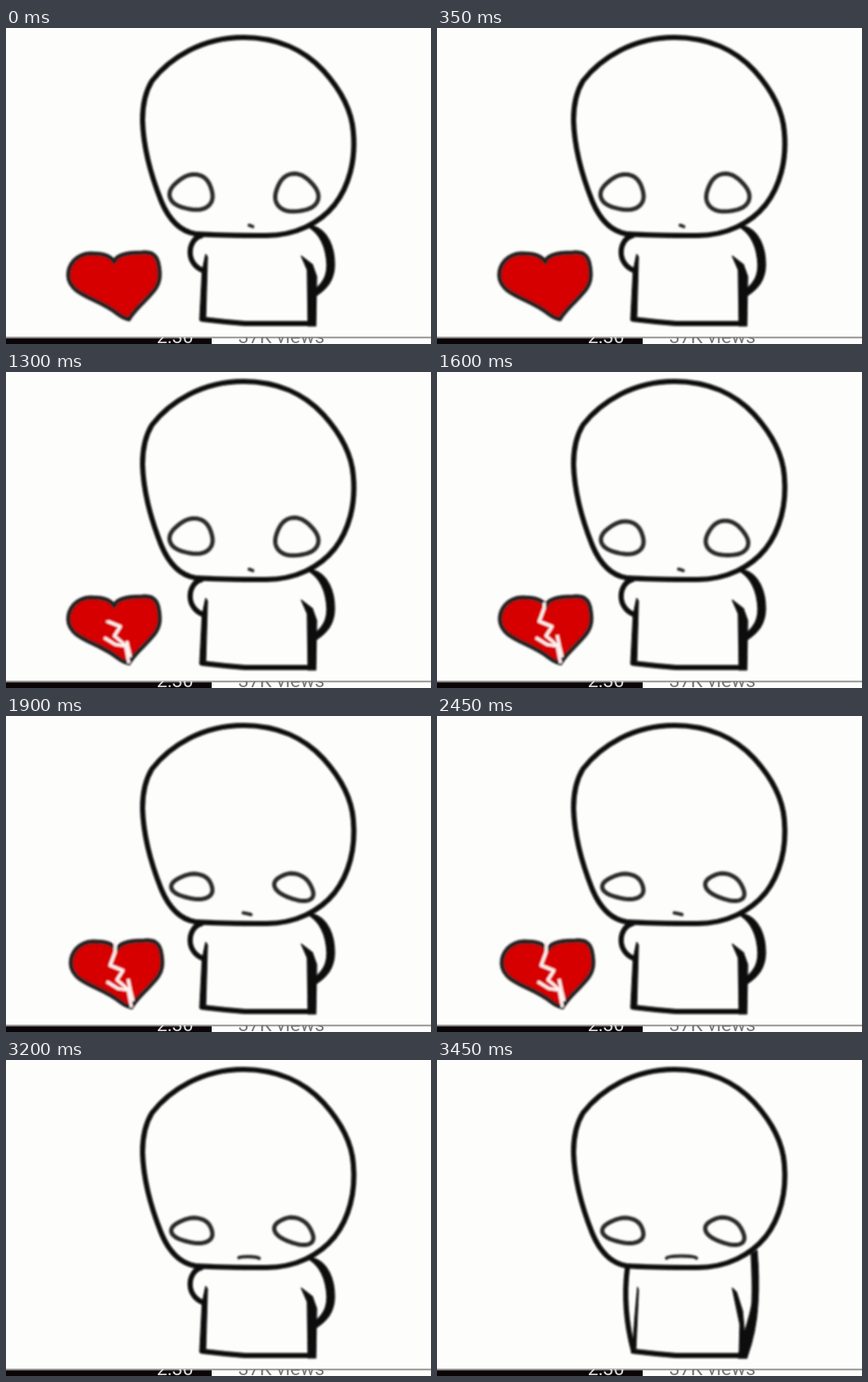
An HTML page for the animation above (4.5 s loop, 498 by 370 pixels).

```html
<!DOCTYPE html>
<html lang="en">
<head>
<meta charset="utf-8">
<title>Breaking heart</title>
<style>
  html, body { margin: 0; width: 100%; height: 100%; overflow: hidden; background: #fdfefc; }
  svg { display: block; width: 498px; height: 370px; }
  .ink { fill: none; stroke: #080808; stroke-width: 6; stroke-linecap: round; stroke-linejoin: round; }
  .thin { stroke: #2c2c2c; stroke-width: 5; }
  .solid { fill: #080808; stroke: #080808; stroke-width: 1.2; stroke-linejoin: round; }
  .crack { fill: none; stroke: #fff3f1; stroke-width: 3.6; stroke-linejoin: round; stroke-dasharray: 1 2; }
  text { font: 22.4px Roboto, Arial, sans-serif; }
</style>
</head>
<body>
<svg viewBox="0 0 498 370">
  <defs>
    <filter id="soft" x="0" y="0" width="498" height="370" filterUnits="userSpaceOnUse">
      <feGaussianBlur stdDeviation=".95"/>
    </filter>
    <clipPath id="strip"><rect y="362" width="498" height="8"/></clipPath>
  </defs>
  <rect width="498" height="370" fill="#fdfefc"/>

  <g filter="url(#soft)">
    <g id="heart">
      <path fill="#d60306" stroke="#282424" stroke-width="5" stroke-linejoin="round"
        d="M127 274C121 265 110 264 99 264C82 265 73 277 73 290C74 313 108 316 130 334Q138 340 144 341C150 330 164 319 172 309C181 299 181 289 179 278C177 265 170 262 159 263C146 263 129 265 127 274Z"/>
      <path id="crack" class="crack" pathLength="1" d="M144 341L140 320L127 309L134 298L119 292L125 276V261"/>
      <path id="forkL" class="crack" pathLength="1" d="M141 321L128 319L115 311"/>
      <path id="forkR" class="crack" pathLength="1" d="M146 334L143 322L140 308"/>
    </g>

    <path id="armL" class="ink"/>
    <path id="armR" class="solid"/>
    <path id="sideL" class="solid"/>
    <path id="sideR" class="solid"/>
    <path class="ink" d="M230 341Q255 344 280 346H360"/>

    <path class="ink" d="M278 11C318 11 350 26 372 50C390 70 405 94 407 122C410 155 402 185 385 207C368 228 340 243 305 243C280 243 250 243 222 241C203 238 190 222 182 203C172 178 161 145 160 108C160 93 163 75 171 62C192 35 230 11 278 11Z"/>
    <path id="eyeL" class="ink thin"/>
    <path id="eyeR" class="ink thin"/>
    <path id="mouth" class="ink thin" style="stroke-width:4"/>
  </g>

  <rect y="361.5" width="498" height="1.8" fill="#8d8d8d"/>
  <rect y="363.3" width="241" height="7" fill="#0b0507"/>
  <g clip-path="url(#strip)">
    <text x="176.5" y="369" fill="#dedcdc">2:30</text>
    <text x="272" y="369" fill="#777">37K views</text>
  </g>
</svg>
<script>
const LOOP = 4500, STEP = 50;
const set = (id, name, value) => document.getElementById(id).setAttribute(name, value);
const mix = (a, b, p) => a + (b - a) * p;
const progress = (t, from, to) => Math.min(1, Math.max(0, (t - from) / (to - from)));
const ease = p => p * p * (3 - 2 * p);

// blend two paths that share the same commands
function morph(a, b, p) {
  const goal = b.match(/[\d.]+/g);
  let i = 0;
  return a.replace(/[\d.]+/g, n => mix(+n, +goal[i++], p));
}

// tilted oval with three soft corners
function eyePath({ x, y, rx, ry, tilt, corner }) {
  const points = [];
  for (let i = 0; i < 48; i++) {
    const a = i / 48 * 2 * Math.PI;
    const r = 1 + .07 * Math.cos(3 * (a - corner));
    const u = rx * r * Math.cos(a), v = ry * r * Math.sin(a);
    const c = Math.cos(tilt), s = Math.sin(tilt);
    points.push([x + u * c - v * s, y + u * s + v * c]);
  }
  return 'M' + points.join('L') + 'Z';
}

const eyes = {
  eyeL: [{ x: 218, y: 193, rx: 25, ry: 20.5, tilt: 0, corner: .8 },
         { x: 219, y: 200, rx: 24, ry: 14.5, tilt: .08, corner: .8 }],
  eyeR: [{ x: 340, y: 194, rx: 25, ry: 22, tilt: .1, corner: .25 },
         { x: 338, y: 200.5, rx: 23.5, ry: 14.5, tilt: .35, corner: .5 }]
};

// arms behind the back, then hanging
const arms = {
  armL: ['M229 243C212 248 210 276 231 284',
         'M223 244C220 268 220 302 230 340'],
  armR: ['M358 231C378 236 385 258 385 277C385 295 376 306 361 315L361 307C372 298 376 290 376 277C375 256 368 242 356 234Z',
         'M375 223C377 245 377 268 376 285C375 306 370 330 363 349L353 349C355 330 366 306 369 285C370 262 369 244 368 227Z'],
  sideL: ['M234 265L236 268L234 338L227 342L230 284Z',
          'M235 266L236 270L233 338L229 340L232 300Z'],
  sideR: ['M346 267L359 277L364 291L363 349L354 349L353 283Z',
          'M346 267L351 272L358 294L363 349L354 349L355 310Z']
};
const mouths = ['M285 231C286 231 288 232 289 232.5',
                'M278 230.5C281 231 284 231.5 287 232.5',
                'M269 232C271 228.5 302 228.5 304 232'];

function draw(time) {
  const t = Math.floor(time / STEP) * STEP;
  const split = progress(t, 400, 1720);
  const sad = ease(progress(t, 1500, 1800));
  const drop = progress(t, 3300, 3450);
  const frown = ease(progress(t, 2900, 3450));

  set('crack', 'stroke-dashoffset', 1 - split);
  set('forkL', 'stroke-dashoffset', 1 - progress(split, .1, .25));
  set('forkR', 'stroke-dashoffset', 1 - progress(split, .1, .9));
  set('heart', 'transform', `translate(${3 * sad} 0)`);
  set('heart', 'opacity', 1 - progress(t, 2750, 3200));

  for (const id in eyes) {
    const [open, low] = eyes[id], now = {};
    for (const key in open) now[key] = mix(open[key], low[key], sad);
    set(id, 'd', eyePath(now));
  }
  for (const id in arms) set(id, 'd', morph(...arms[id], drop));
  set('armL', 'stroke-width', mix(6, 4.5, drop));
  set('mouth', 'd', frown ? morph(mouths[1], mouths[2], frown) : morph(mouths[0], mouths[1], sad));
}

const start = performance.now();
function frame() {
  draw((performance.now() - start) % LOOP);
  requestAnimationFrame(frame);
}
draw(0);
requestAnimationFrame(frame);
</script>
</body>
</html>
```
